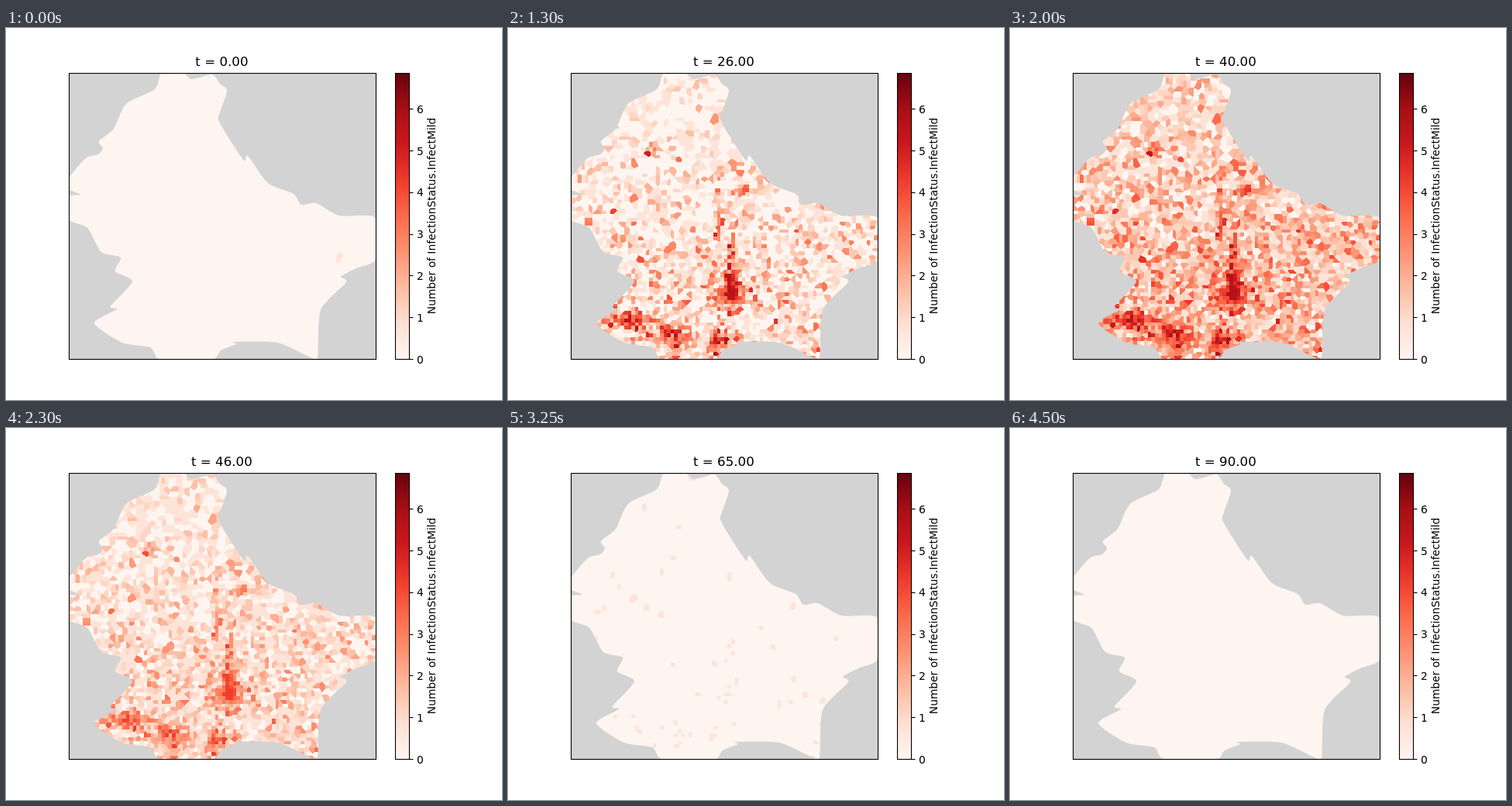
An HTML page with a canvas for the animation above (4550 ms loop, 640 by 480 pixels).

```html
<!DOCTYPE html>
<html>
<head>
<meta charset="utf-8">
<style>
html, body { margin: 0; width: 100%; height: 100%; overflow: hidden; background: #fff; }
canvas { display: block; }
</style>
</head>
<body>
<canvas id="stage" width="640" height="480"></canvas>
<script>
const ctx = document.getElementById('stage').getContext('2d');
const LEFT = 81, TOP = 58, W = 397, H = 370;
const STEP_MS = 50, STEPS = 91, PEAK_DAY = 34;
const VMAX = 6.86, UNIT = 53.9, ZERO_Y = 427.2;

// Key points of the country's outline, joined by a smooth curve
const outline = `201,58 228,58 240,66 266,60 276,72 285,81 276,109 274,118 285,138 307,171 312,165
  338,200 371,214 381,228 400,226 430,242 477,245 477,298 452,310 432,321 439,328 406,364 402,425
  391,424 350,406 294,405 297,408 277,416 265,428 200,428 186,412 150,406 114,381 143,363 135,359
  163,327 141,314 148,296 123,289 105,258 81,247 81,218 96,215 81,208 81,194 103,168 119,163 125,155
  120,146 139,130 155,98 192,79`.split(/\s+/).map(p => p.split(',').map(Number));

// Towns and valleys: x, y, radius x, radius y
const towns = [
  [288, 343, 18, 11], [288, 315, 5, 30], [160, 378, 22, 8], [210, 398, 18, 8],
  [270, 404, 10, 12], [272, 240, 4, 28], [304, 211, 9, 5], [185, 157, 7, 5]
];

const reds = ['fff5f0', 'fee0d2', 'fcbba1', 'fc9272', 'fb6a4a', 'ef3b2c', 'cb181d', 'a50f15', '67000d']
  .map(hex => [0, 2, 4].map(i => parseInt(hex.slice(i, i + 2), 16)));

function smoothPath(points, tension = .12) {
  const path = new Path2D(), at = i => points[(i + points.length) % points.length];
  const control = (i, sign) =>
    [0, 1].map(k => at(i)[k] + sign * tension * (at(i + 1)[k] - at(i - 1)[k]));
  path.moveTo(...at(0));
  points.forEach((_, i) => path.bezierCurveTo(...control(i, 1), ...control(i + 1, -1), ...at(i + 1)));
  return path;
}
const border = smoothPath(outline);

// Repeatable random number in [0, 1)
function random(a, b) {
  let h = Math.imul(a + 1, 0x9e3779b1) ^ Math.imul(b + 7, 0x85ebca6b);
  h = Math.imul(h ^ h >>> 15, 0x2c1b3c6d);
  h = Math.imul(h ^ h >>> 13, 0x297a2d39);
  return ((h ^ h >>> 16) >>> 0) / 4294967296;
}

function red(value) {
  const pos = Math.min(1, value / VMAX) * 8, i = Math.min(7, Math.floor(pos));
  return reds[i].map((c, k) => Math.round(c + (reds[i + 1][k] - c) * (pos - i)));
}

// Inhabited grid squares, with gaps; people is a logarithm
const DX = 4.6, DY = 4.8, COLS = Math.ceil(W / DX), ROWS = Math.ceil(H / DY);
const cells = [], grid = [];
for (let id = 0; id < ROWS * COLS; id++) {
  const x = LEFT + (id % COLS + .5) * DX, y = TOP + (Math.floor(id / COLS) + .5) * DY;
  const south = (y - TOP) / H;
  let town = 0;
  for (const [tx, ty, rx, ry] of towns)
    town += 3.6 * Math.exp(-(((x - tx) / rx) ** 2 + ((y - ty) / ry) ** 2) / 2);
  if (random(id, 1) > .38 + .25 * south + .2 * town) continue;
  const spread = random(id, 2) + random(id, 3) + random(id, 4) - 1.5;
  const people = Math.min(6.8, .9 + 1.5 * south + town + spread * (town > 2 ? 1.8 : 3));
  grid[id] = cells.length;
  cells.push({ id, people });
}

// Nearest inhabited square for every pixel
const owner = new Int32Array(W * H);
for (let y = 0; y < H; y++) {
  for (let x = 0; x < W; x++) {
    const col = Math.floor(x / DX), row = Math.floor(y / DY);
    let best = Infinity;
    for (let r = Math.max(0, row - 3); r <= Math.min(ROWS - 1, row + 3); r++) {
      for (let c = Math.max(0, col - 3); c <= Math.min(COLS - 1, col + 3); c++) {
        const cell = grid[r * COLS + c];
        if (cell === undefined) continue;
        const d = (x + .5 - (c + .5) * DX) ** 2 + (y + .5 - (r + .5) * DY) ** 2;
        if (d < best) { best = d; owner[y * W + x] = cell; }
      }
    }
  }
}
const firstCase = cells[owner[(293 - TOP) * W + 430 - LEFT]];

// The wave starts in dense places, then evens out and fades
function infected(cell, day) {
  if (cell === firstCase && day < 7) return 1;
  const late = day - PEAK_DAY, rising = late < 0;
  const strength = -(rising ? .168 : .05) * Math.abs(late) ** 1.37;
  const density = 1 - (rising ? .03 : .013) * late;
  const mean = Math.exp(cell.people * density + strength);
  const period = Math.floor(day / 5 + random(cell.id, 5));
  return Math.floor(mean + random(cell.id, 10 + period));
}

const map = document.createElement('canvas');
map.width = W;
map.height = H;
const mapCtx = map.getContext('2d'), pixels = mapCtx.createImageData(W, H);
const packed = new Uint32Array(pixels.data.buffer);

function drawMap(day) {
  const colors = cells.map(cell => {
    const [r, g, b] = red(Math.log(1 + infected(cell, day)));
    return (255 << 24 | b << 16 | g << 8 | r) >>> 0;
  });
  for (let i = 0; i < packed.length; i++) packed[i] = colors[owner[i]];
  mapCtx.putImageData(pixels, 0, 0);
  ctx.fillStyle = '#d3d3d3';
  ctx.fillRect(LEFT, TOP, W, H);
  ctx.save();
  ctx.clip(border);
  ctx.drawImage(map, LEFT, TOP);
  ctx.restore();
  ctx.strokeRect(81.5, 58.5, 396, 369);
}

function text(string, x, y, size, align) {
  ctx.font = `${size}px "DejaVu Sans", sans-serif`;
  ctx.textAlign = align;
  ctx.fillStyle = '#000';
  ctx.fillText(string, x, y);
}

const bar = ctx.createLinearGradient(0, ZERO_Y, 0, 57.6);
reds.forEach((c, i) => bar.addColorStop(i / 8, `rgb(${c})`));

function drawColorbar() {
  ctx.fillStyle = bar;
  ctx.fillRect(502, 58, 18.5, 369.5);
  ctx.strokeRect(502.5, 58.5, 18, 369);
  for (let v = 0; v <= 6; v++) {
    text(v, 530, Math.round(433 - v * UNIT), 13.89, 'left');
    ctx.fillRect(520.5, Math.round(ZERO_Y - v * UNIT), 5, 1.1);
  }
  ctx.save();
  ctx.translate(554, 242.4);
  ctx.rotate(-Math.PI / 2);
  text('Number of InfectionStatus.InfectMild', 0, 0, 13.8, 'center');
  ctx.restore();
}

function draw(day) {
  ctx.fillStyle = '#fff';
  ctx.fillRect(0, 0, 640, 480);
  ctx.strokeStyle = '#000';
  ctx.lineWidth = 1.1;
  drawMap(day);
  drawColorbar();
  text(`t = ${day.toFixed(2)}`, 278.4, 49, 16.67, 'center');
}

const start = performance.now();
let shown = -1;
function tick() {
  const day = Math.floor((performance.now() - start) / STEP_MS) % STEPS;
  if (day !== shown) draw(shown = day);
  requestAnimationFrame(tick);
}
tick();
</script>
</body>
</html>
```
